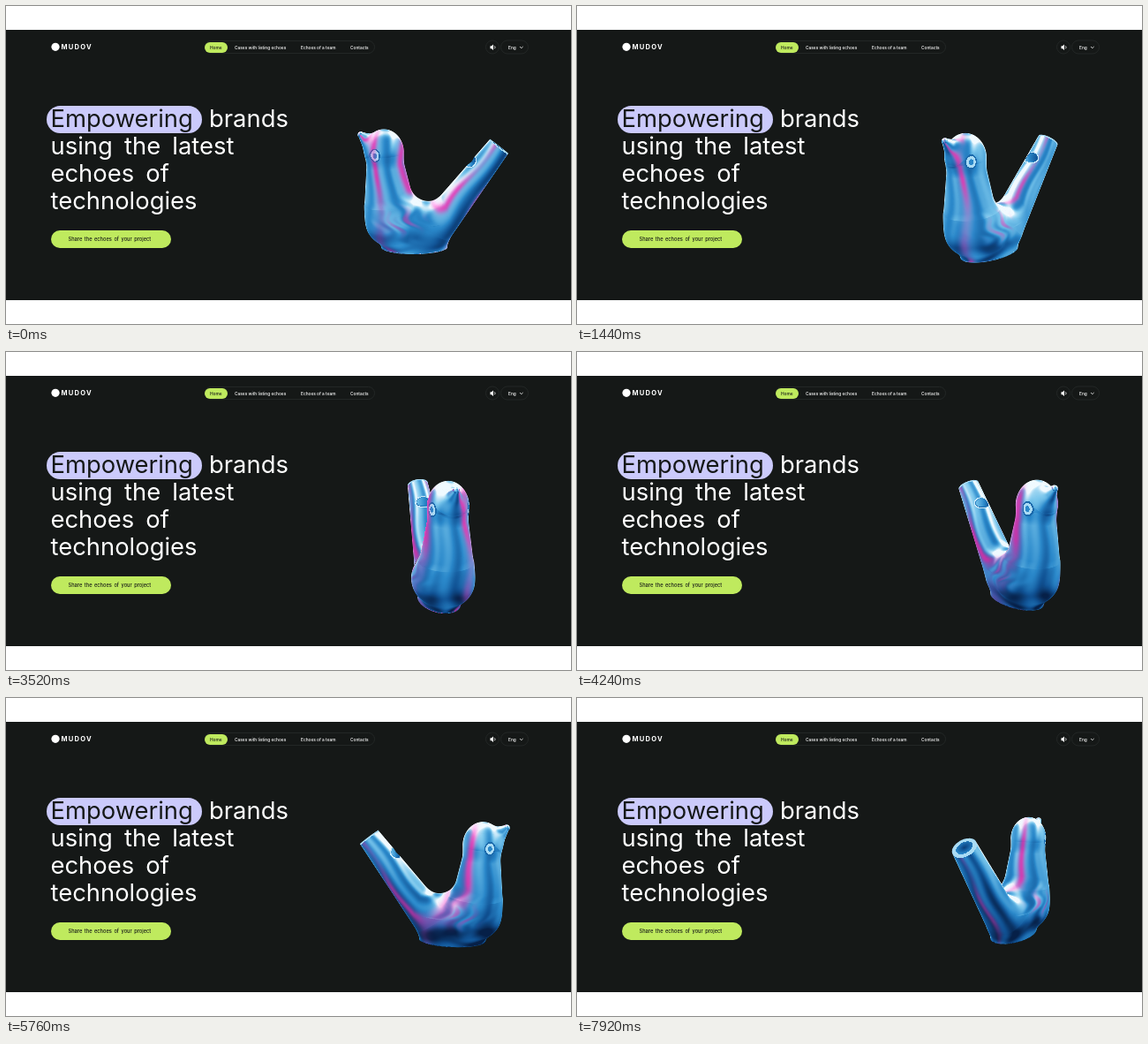
Recreate the animation shown at these times as an HTML page with a canvas. Size 640 by 360 pixels, loop 8 s.

```html
<!DOCTYPE html>
<html lang="en">
<head>
<meta charset="utf-8">
<title>Echoes</title>
<style>
html, body { margin: 0; width: 100%; height: 100%; overflow: hidden; background: #fff; }
canvas { display: block; }
</style>
</head>
<body>
<canvas id="stage" width="640" height="360"></canvas>
<script>
const ctx = document.getElementById('stage').getContext('2d');
const LOOP = 8000, STEP = 80, TURN = 12000;
const INK = '#151817', LIME = '#bfea5e', LILAC = '#cbcafb';

const clamp = (v, a = 0, b = 1) => Math.min(b, Math.max(a, v));
const mix = (a, b, k) => a + (b - a) * k;
const bell = (x, w) => Math.exp(-x * x / (w * w));

// ---------- page ----------
function pill(x, y, w, h, fill, line) {
  ctx.beginPath();
  ctx.roundRect(x, y, w, h, h / 2);
  if (fill) { ctx.fillStyle = fill; ctx.fill(); }
  if (line) { ctx.strokeStyle = line; ctx.lineWidth = 1; ctx.stroke(); }
}

function text(str, x, y, size, color, weight = 500, gap = 0, word = 0) {
  ctx.font = `${weight} ${size}px Inter, sans-serif`;
  ctx.letterSpacing = gap + 'px';
  ctx.wordSpacing = word + 'px';
  ctx.fillStyle = color;
  ctx.fillText(str, x, y);
}

function page() {
  ctx.fillStyle = '#fff';
  ctx.fillRect(0, 0, 640, 360);
  ctx.fillStyle = INK;
  ctx.fillRect(0, 27, 640, 306);

  ctx.fillStyle = '#fff';
  ctx.beginPath();
  ctx.arc(56, 46.3, 4.6, 0, 7);
  ctx.fill();
  text('MUDOV', 62.5, 49, 7.6, '#fff', 700, 1.2);

  const faint = '#232726', nav = (s, x, color = '#fff') => text(s, x, 48.5, 4.8, color);
  pill(225.5, 39.5, 192, 14, null, faint);
  pill(225, 41, 26, 12, LIME);
  nav('Home', 231, INK);
  nav('Cases with listing echoes', 259);
  nav('Echoes of a team', 334);
  nav('Contacts', 390);

  pill(543.5, 39, 15, 15, null, faint);
  pill(560.5, 39, 31, 15, null, faint);
  ctx.fillStyle = '#fff';
  ctx.beginPath();
  ctx.moveTo(548.5, 45.3);
  ctx.lineTo(550, 45.3);
  ctx.lineTo(552, 43.5);
  ctx.lineTo(552, 50);
  ctx.lineTo(550, 48.3);
  ctx.lineTo(548.5, 48.3);
  ctx.fill();
  ctx.strokeStyle = '#fff';
  ctx.lineWidth = 0.8;
  ctx.beginPath();
  ctx.arc(552, 46.8, 2, -0.9, 0.9);
  ctx.moveTo(582, 46);
  ctx.lineTo(583.8, 47.7);
  ctx.lineTo(585.6, 46);
  ctx.stroke();
  nav('Eng', 569);

  pill(46, 113, 176, 31, LILAC);
  const head = (s, x, y, color) => text(s, x, y, 27.4, color, 400, 0, 5.5);
  head('Empowering', 50.5, 136.6, INK);
  head('brands', 230, 136.6, '#fff');
  ['using the latest', 'echoes of', 'technologies'].forEach((s, i) => head(s, 50.5, 167.6 + i * 31, '#fff'));

  pill(51, 254, 136, 20, LIME);
  text('Share the echoes of your project', 70.5, 265.6, 5.7, INK, 500, 0, 1);
}

// ---------- whistle shape: distance field, x runs along the pipe ----------
const END = [72, 59], U = [0.6, 0.8], SLOT = [43.5, 41];

function cone(x, y, z, ax, ay, ar, bx, by, br) {
  const dx = bx - ax, dy = by - ay;
  const h = clamp(((x - ax) * dx + (y - ay) * dy) / (dx * dx + dy * dy));
  const px = x - ax - h * dx, py = y - ay - h * dy;
  return Math.sqrt(px * px + py * py + z * z) - mix(ar, br, h);
}

function egg(x, y, z, rx, ry, rz) {
  x /= rx; y /= ry; z /= rz;
  const k = Math.sqrt(x * x + y * y + z * z);
  x /= rx; y /= ry; z /= rz;
  return k * (k - 1) / (Math.sqrt(x * x + y * y + z * z) + 1e-6);
}

function join(a, b, k) {
  const h = Math.max(k - Math.abs(a - b), 0) / k;
  return Math.min(a, b) - h * h * k * 0.25;
}

const along = (x, y) => (x - END[0]) * U[0] + (y - END[1]) * U[1];
const toSlot = (x, y, z) => Math.sqrt((x - SLOT[0]) ** 2 + (y - SLOT[1]) ** 2 + z * z * 0.6);

function dist(x, y, z) {
  const pipe = Math.max(cone(x, y, z, 72, 59, 12.3, 2, -36, 20), along(x, y));
  let d = join(egg(x + 54, y - 56, z, 20, 21.5, 19), cone(x, y, z, -54, 50, 18.5, -50, -5, 27.5), 8);
  d = join(d, cone(x, y, z, -64, 59, 14, -79, 72, 3), 4);
  d = join(d, egg(x + 38, y + 28, z, 39, 30, 33), 12);
  d = join(d, pipe, 22);
  d = join(d, Math.max(egg(x + 22, 0, z, 38, 30, 22), y + 30), 6);
  d = Math.max(d, -58 - y);
  return Math.max(d, 6.5 - toSlot(x, y, z));
}

// ---------- whistle render ----------
const X0 = 384, Y0 = 124, W = 204, H = 180, CX = 484, CY = 218, EYE = 500, BLOCK = 6;
const TC = Math.cos(0.262), TS = Math.sin(0.262);
const layer = document.createElement('canvas');
layer.width = W;
layer.height = H;
const lctx = layer.getContext('2d');

const RAMP = [[6, 32, 72], [16, 82, 148], [42, 136, 202], [122, 198, 236], [240, 250, 255]];
const PINK = [214, 44, 166];

// Pink reflections: horizontal normal of three bands over time.
const BANDS = [[0, -0.35, 0.95, -2], [1440, -0.1, 1.8, -2], [2320, 0.05, 2, -1.7],
  [3520, 0.82, 2, -0.92], [4960, 1.6, 2, -0.75], [6640, 2, 2, -0.36], [8000, 2, 2, -0.25]];

function bandsAt(t) {
  let i = 1;
  while (t > BANDS[i][0]) i++;
  const a = BANDS[i - 1], b = BANDS[i], k = (t - a[0]) / (b[0] - a[0]);
  return [1, 2, 3].map(j => mix(a[j], b[j], k));
}

function shade(x, y, z, nx, ny, nz, bands, side) {
  const wing = bell(x + 32, 24) * bell(y + 18, 17) * clamp(Math.abs(z) / 20);
  const ripple = wing * Math.sin(x * 0.3 + y * 0.22 + 1.3 * Math.sin(y * 0.28));
  const sx = nx + 0.1 * Math.sin(y * 0.07 + x * 0.03) + ripple * 0.12;
  const sy = ny + ripple * 0.2;

  let v = 0.5 + 0.06 * side + 0.0015 * y * (1 - side) + 0.12 * sy;
  v += 0.13 * Math.cos(sx * 6.5 + sy * 2 + 0.9);
  v += 0.45 * bell(sx + 0.52, 0.17) * clamp(0.6 + sy * 0.7);
  v += 0.32 * bell(sx - 0.5, 0.14) * clamp(0.5 + sy);
  v += 0.4 * bell(sy - 0.72, 0.2);
  v -= 0.2 * bell(sy + 0.55, 0.25);
  v += 0.3 * bell(nz, 0.2);

  let pink = Math.max(...bands.map(b => bell(sx - b, 0.16)));
  pink *= clamp(0.75 + 0.5 * Math.sin(y * 0.05 + 1 + x * 0.03)) * clamp(1.2 - Math.abs(ny));
  pink = Math.max(pink, wing * clamp(ripple * 1.3 - 0.2) * 0.6);

  const a = along(x, y);
  if (a > -1) {
    const r = Math.hypot(x - END[0] - a * U[0], y - END[1] - a * U[1], z);
    v = r < 8.7 ? 0.16 + 0.035 * r + 0.012 * (END[1] - y) : 0.85;
    pink = 0;
  }
  const s = toSlot(x, y, z);
  if (s < 8) {
    v = s < 6.9 ? 0.5 + 0.25 * nx : 0.92;
    pink = 0;
  }
  if (Math.abs(z) > 8) {
    const e = Math.hypot((x + 62) / 5, (y - 52) / 6.5);
    if (e < 1.15) {
      v = e < 0.45 ? 0.5 : e < 0.9 ? 0.85 : 0.36;
      pink *= 0.5;
    }
  }

  const f = clamp(v) * 3.999, i = f | 0;
  const p = clamp(pink) * 0.88;
  return PINK.map((c, j) => mix(mix(RAMP[i][j], RAMP[i + 1][j], f - i), c + 70 * clamp(v - 0.5), p));
}

function whistle(t) {
  const angle = t / TURN * Math.PI * 2, c = Math.cos(angle), s = Math.sin(angle);
  const bands = bandsAt(t);
  const img = lctx.createImageData(W, H);
  const toModel = (x, y, z) => {
    const my = y * TC - z * TS, mz = y * TS + z * TC;
    return [x * c + mz * s, my, mz * c - x * s];
  };
  const o = toModel(0, 0, -EYE), FAR = EYE + 110;

  // Marches one ray; returns the nearest approach.
  function march(px, py, from, stop) {
    const vx = px - CX, vy = CY - py, len = Math.hypot(vx, vy, EYE);
    const dir = toModel(vx / len, vy / len, EYE / len);
    let best = 1e9, at = from;
    for (let r = from, i = 0; r < FAR && i < 60; i++) {
      const d = dist(o[0] + dir[0] * r, o[1] + dir[1] * r, o[2] + dir[2] * r);
      if (d < best) { best = d; at = r; }
      if (d < stop) break;
      r += Math.max(d * 0.9, 0.25);
    }
    return { best, at, dir };
  }

  function pixel(ix, iy, from) {
    const { best, at, dir } = march(X0 + ix + 0.5, Y0 + iy + 0.5, from, 0.15);
    if (best > 0.8) return;
    const [x, y, z] = o.map((v, i) => v + dir[i] * at);
    const e = 0.6, d = dist(x, y, z);
    let gx = dist(x + e, y, z) - d, gy = dist(x, y + e, z) - d, gz = dist(x, y, z + e) - d;
    const g = Math.hypot(gx, gy, gz) || 1;
    gx /= g; gy /= g; gz /= g;
    const depth = gx * s + gz * c;
    const rgb = shade(x, y, z, gx * c - gz * s, gy * TC + depth * TS, gy * TS - depth * TC, bands, c);
    const k = (iy * W + ix) * 4;
    img.data.set([rgb[0], rgb[1], rgb[2], 255 * clamp(1.2 - best / 0.7)], k);
  }

  for (let by = 0; by < H; by += BLOCK) {
    for (let bx = 0; bx < W; bx += BLOCK) {
      const m = march(X0 + bx + BLOCK / 2, Y0 + by + BLOCK / 2, EYE - 115, 6);
      if (m.best >= 6) continue;
      for (let j = 0; j < BLOCK; j++) {
        for (let i = 0; i < BLOCK; i++) pixel(bx + i, by + j, m.at - 4);
      }
    }
  }
  lctx.putImageData(img, 0, 0);
}

// ---------- loop ----------
let shown = -1;
function frame() {
  const t = Math.floor(performance.now() % LOOP / STEP) * STEP;
  if (t !== shown) {
    shown = t;
    whistle(t);
    page();
    ctx.drawImage(layer, X0, Y0);
  }
  requestAnimationFrame(frame);
}
frame();
</script>
</body>
</html>
```
